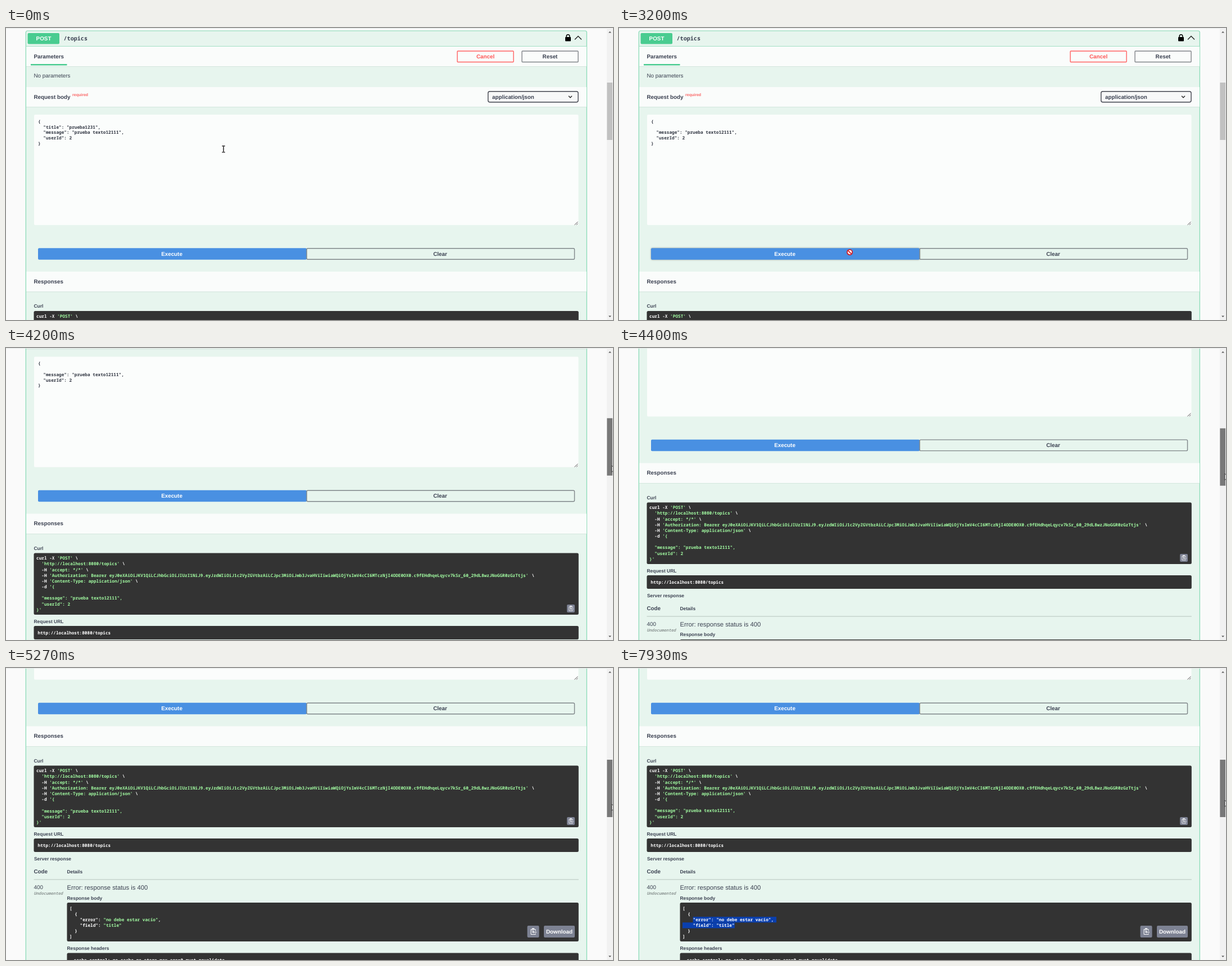
These frames come from a looping animation (1080 px wide and 519 px high, 8000 ms). An HTML page with a canvas:

```html
<!DOCTYPE html>
<html lang="es">
<head>
<meta charset="utf-8">
<style>
html, body { margin: 0; width: 100%; height: 100%; overflow: hidden; background: #fafafa; }
canvas { display: block; }
</style>
</head>
<body>
<canvas id="stage" width="1080" height="519"></canvas>
<script>
const ctx = document.getElementById('stage').getContext('2d');
const SANS = '"Liberation Sans", Arial, sans-serif';
const MONO = '"Noto Sans Mono", "DejaVu Sans Mono", monospace';
const INK = '#3b4151', GREEN = '#49cc90', DARK = '#333', STRING = '#a2fca2', SELECTED = '#0a3fae';
const CHAR = 4.64, LOOP = 8000;

// [time, x, y] of the pointer
const POINTER = [
  [67, 387, 215], [533, 168, 176], [933, 87, 175], [1400, 69, 174], [1667, 69, 174],
  [2000, 239, 160], [2400, 239, 160], [2533, 356, 262], [2600, 356, 262], [2933, 410, 398],
  [3467, 410, 398], [3867, 1078, 181], [3933, 1078, 181], [4200, 1078, 209], [4333, 1078, 222],
  [4667, 1078, 234], [4867, 1078, 235], [5267, 1078, 242], [5733, 215, 472], [6000, 206, 458],
  [6600, 139, 447], [7067, 133, 447], [7200, 133, 447], [7933, 1078, 235]
];
const SCROLL = [[3933, 0], [4200, 138.5], [4333, 214], [4667, 286.5], [4733, 289], [4867, 289], [5267, 329.5]];

const CURL = [
  "curl -X |'POST'| \\",
  "  |'http://localhost:8080/topics'| \\",
  "  -H |'accept: */*'| \\",
  "  -H |'Authorization: Bearer eyJ0eXAiOiJKV1QiLCJhbGciOiJIUzI1NiJ9.eyJzdWIiOiJ1c2VyZGVtbzAiLCJpc3MiOiJmb3JvaHViIiwiaWQiOjYsImV4cCI6MTczNjI4ODE0OX0.c9fEHdhqeLqycv7kSr_60_29dL8wzJNoGGR0zGzTtjs'| \\",
  "  -H |'Content-Type: application/json'| \\",
  "  -d |'{",
  "",
  '|  "message": "prueba texto12111",',
  '|  "userId": 2',
  "|}'"
];
const ERRORS = ['[', '  {', '    "error": |"no debe estar vacío"|,', '    "field": |"title"', '  }', ']'];

function track(keys, t, ease = u => u) {
  if (t <= keys[0][0]) return keys[0].slice(1);
  const i = keys.findIndex(k => k[0] > t);
  if (i < 0) return keys[keys.length - 1].slice(1);
  const a = keys[i - 1], b = keys[i], u = ease((t - a[0]) / (b[0] - a[0]));
  return a.slice(1).map((v, j) => v + (b[j + 1] - v) * u);
}

function text(str, x, y, { size = 9.84, color = INK, weight = 'bold', font = SANS, align = 'left' } = {}) {
  ctx.font = `${weight} ${size}px ${font}`;
  ctx.textAlign = align;
  ctx.fillStyle = color;
  ctx.fillText(str, x, y + size * 0.36);
}

function mono(str, x, y, color = '#fff', size = CHAR / 0.6, weight = 'bold') {
  text(str, x, y, { size, color, weight, font: MONO });
}

function box(x, y, w, h, fill, radius = 0, stroke, line = 1.4) {
  ctx.beginPath();
  ctx.roundRect(x, y, w, h, radius);
  if (fill) { ctx.fillStyle = fill; ctx.fill(); }
  if (stroke) { ctx.strokeStyle = stroke; ctx.lineWidth = line; ctx.stroke(); }
}

function path(points, { stroke, fill, width = 1 }) {
  ctx.beginPath();
  points.forEach(([x, y]) => ctx.lineTo(x, y));
  if (fill) { ctx.fillStyle = fill; ctx.fill(); }
  if (stroke) { ctx.strokeStyle = stroke; ctx.lineWidth = width; ctx.stroke(); }
}

// "|" switches between plain and string colour
function code(line, x, y) {
  let col = 0;
  line.split('|').forEach((part, i) => {
    mono(part, x + col * CHAR, y, i % 2 ? STRING : '#fff');
    col += part.length;
  });
}

function highlight(line, x, y, from, to) {
  if (to <= from) return;
  const left = x + from * CHAR;
  ctx.fillStyle = SELECTED;
  ctx.fillRect(left, y - 5, (to - from) * CHAR, 10.2);
  mono(line.replace(/\|/g, '').slice(from, to), left, y);
}

function band(y, h) {
  box(36, y, 997, h, '#fafcfb');
  box(36, y + h, 997, 1, '#d3e6dd');
}

function copyButton(x, y, size) {
  box(x, y, size, size, '#7d8293', 2);
  const k = size / 21, cx = x + size / 2, cy = y + size / 2;
  ctx.save();
  ctx.translate(cx, cy);
  ctx.scale(Math.max(k, 0.8), Math.max(k, 0.8));
  path([[4, -1], [4, -4], [-4, -4], [-4, 5], [4, 5], [4, 3]], { stroke: '#fff' });
  box(-2, -6, 4, 2.5, '#fff');
  path([[6, 1], [-1, 1], [1, -1], [-1, 1], [1, 3]], { stroke: '#fff' });
  path([[-2.5, -1.5], [1, -1.5]], { stroke: '#fff' });
  ctx.restore();
}

function drawRequest(t, px) {
  box(38.5, 9, 56.5, 19.5, GREEN, 2);
  text('POST', 67, 18.5, { color: '#fff', align: 'center' });
  mono('/topics', 102.5, 18.5, INK, 10.15);
  box(36, 32, 997, 1, '#a3dfc5');
  box(995, 16, 10, 7.5, '#000', 1);
  ctx.beginPath();
  ctx.arc(1000, 14.5, 2.8, Math.PI, 0);
  ctx.lineTo(1002.8, 17);
  ctx.moveTo(997.2, 14.5);
  ctx.lineTo(997.2, 17);
  ctx.strokeStyle = '#000';
  ctx.lineWidth = 1.5;
  ctx.stroke();
  path([[1012, 20.5], [1018, 14.5], [1024, 20.5]], { stroke: '#222', width: 1.4 });

  band(33, 35);
  text('Parameters', 49.5, 50);
  box(44, 64, 64.5, 2.6, GREEN);
  box(803, 41, 100, 19.5, null, 1, '#ff6060');
  text('Cancel', 853, 50.5, { color: '#ff5555', align: 'center' });
  box(918, 41, 100, 19.5, null, 1, '#808489');
  text('Reset', 968, 50.5, { align: 'center' });
  text('No parameters', 49.5, 84.5, { weight: 'normal' });

  band(105, 35);
  text('Request body', 49.5, 122);
  text('required', 118, 118.5, { size: 7.03, color: '#fa6464' });
  box(857.7, 112.7, 160.3, 19, '#f7f8f8', 3, '#41444e');
  text('application/json', 865, 122);
  path([[1001, 120.8], [1004, 123.8], [1007, 120.8]], { stroke: '#222', width: 1.3 });

  const focused = t >= 530 && t < 3060, shift = focused ? 1 : 0;
  box(50, 154, 968.5, 196.3, '#fbfdfc', 2, focused ? '#61affe' : null);
  const title = t < 2195 ? '  "title": "prueba1231",' : '';
  const left = 57 + shift, rowY = i => 166 + shift + i * 9.75;
  ['{', title, '  "message": "prueba texto12111",', '  "userId": 2', '}']
    .forEach((line, i) => mono(line, left, rowY(i), '#2f3440'));
  if (focused && title) {
    const start = t > 1400 ? 2 : Math.max(2, Math.round((px - left) / CHAR));
    highlight(title, left, rowY(1), start, title.length);
  }
  if (focused && !title && (t - 2200) % 1000 < 500) box(67.5, 171.5, 0.8, 9.5, '#333');
  path([[1011.5, 350], [1017.5, 344.5]], { stroke: '#555' });
  path([[1014.8, 350], [1017.5, 347.5]], { stroke: '#555' });

  ctx.save();
  if (t > 2860 && t < 3600) { ctx.shadowColor = '#0006'; ctx.shadowBlur = 3; }
  box(57, 391.2, 478, 20.5, '#4990e2', 2);
  ctx.restore();
  box(535, 391.7, 476.5, 19.5, null, 2, '#7f8689');
  text('Execute', 295, 401.3, { color: '#fff', align: 'center' });
  text('Clear', 772.5, 401.3, { align: 'center' });
}

function drawResponse(t, px, py) {
  const label = (str, x, y) => text(str, x, y, { size: 8.44 });
  band(433, 35.5);
  text('Responses', 49.5, 450.3);
  label('Curl', 49.5, 494.3);
  box(49.5, 503, 969.3, 109.5, DARK, 2.5);
  CURL.forEach((line, i) => code(line, 54, 512 + i * 10.17));
  copyButton(998, 594.5, 14);
  label('Request URL', 49.5, 624.5);
  box(49.5, 632.5, 969.3, 24, DARK, 2.5);
  mono('http://localhost:8080/topics', 56.5, 644.7);
  label('Server response', 50, 668.8);
  text('Code', 49.5, 691);
  label('Details', 108.5, 691.3);
  box(49.5, 705, 969.3, 1, '#b6c4be');
  text('400', 49.5, 719, { weight: 'normal' });
  mono('Undocumented', 49.5, 729.7, '#8d9694', 7.17, 'italic bold');
  text('Error: response status is 400', 108.5, 719.7, { size: 11.25, weight: 'normal' });
  label('Response body', 108.5, 738);
  box(108.5, 746.5, 910.3, 69, DARK, 2.5);
  const rowY = i => 756.5 + i * 10.1;
  ERRORS.forEach((line, i) => code(line, 113, rowY(i)));
  if (t >= 6000) {
    const upper = py < 452 || t > 6600;
    const col = t > 7060 ? 4 : Math.max(upper ? 4 : 0, Math.round((px - 113) / CHAR));
    if (upper) highlight(ERRORS[2] + ' ', 113, rowY(2), col, 36);
    highlight(ERRORS[3], 113, rowY(3), upper ? 0 : col, 20);
  }
  copyButton(927.5, 787.5, 21);
  box(957, 787.5, 55, 21, '#7d8293', 2);
  text('Download', 984.5, 798, { color: '#fff', align: 'center' });
  label('Response headers', 108.5, 827.5);
  box(108.5, 836, 910.3, 60, DARK, 2.5);
  mono('cache-control: no-cache,no-store,max-age=0,must-revalidate', 120.5, 848.5);
}

function drawScrollbar(t, px, scroll, loading) {
  const pressed = (t > 3920 && t < 5280) || t > 7860;
  box(1069, 0, 11, 519, '#f1f1f1');
  const color = pressed ? '#787878' : px > 1068 ? '#a8a8a8' : '#c1c1c1';
  box(1069.3, 97 + scroll * 0.2 - (loading ? 3 : 0), 9.7, 102, color);
  path([[1072, 8.5], [1074.5, 6], [1077, 8.5]], { fill: '#505050' });
  path([[1072, 511.5], [1074.5, 514], [1077, 511.5]], { fill: '#505050' });
}

function drawPointer(t, x, y, scroll) {
  const pageY = y + scroll;
  const overText = (x > 50 && x < 1019 && pageY > 153 && pageY < 351) ||
    (x > 108 && x < 300 && pageY > 746 && pageY < 815);
  ctx.save();
  ctx.translate(x, y);
  if (t > 3120 && t < 3330) {
    ctx.beginPath();
    ctx.arc(0.5, 0.5, 4.6, 0, 7);
    ctx.fillStyle = '#fff';
    ctx.fill();
    ctx.strokeStyle = '#d0202a';
    ctx.lineWidth = 1.8;
    ctx.stroke();
    path([[-2.7, -2.7], [3.7, 3.7]], { stroke: '#d0202a', width: 1.8 });
  } else if (overText) {
    ctx.globalCompositeOperation = 'difference';
    const ink = { stroke: '#fff', width: 1.3 };
    path([[0, -5], [0, 5.5]], ink);
    path([[-2.6, -5.3], [2.6, -5.3]], ink);
    path([[-2.6, 5.8], [2.6, 5.8]], ink);
  } else {
    path([[0, 0], [0, 11.5], [2.7, 9], [4.5, 13], [6.2, 12.2], [4.5, 8.4], [8, 8.2], [0, 0]],
      { fill: '#fff', stroke: '#222', width: 0.9 });
  }
  ctx.restore();
}

function draw(now) {
  const t = Math.floor((now % LOOP + 4) * 0.015) / 0.015;
  const [px, py] = track(POINTER, t, u => u * u * (3 - 2 * u));
  const [scroll] = track(SCROLL, t);
  const loading = t > 3120 && t < 3190;

  ctx.textRendering = 'geometricPrecision';
  box(0, 0, 1080, 519, '#fafafa');
  ctx.save();
  ctx.translate(0, -scroll);
  box(35.3, 5, 998, 1000, '#e7f5ee', 3, '#83d9b3', 1.2);
  drawRequest(t, px);
  if (loading) ctx.translate(0, 80);
  drawResponse(t, px, py);
  ctx.restore();
  box(0, 0, 1069, 1, '#e6e9e8');
  drawScrollbar(t, px, scroll, loading);
  drawPointer(t, px, py, scroll);
}

const begin = performance.now();
function tick() {
  draw(performance.now() - begin);
  requestAnimationFrame(tick);
}
tick();
</script>
</body>
</html>
```
